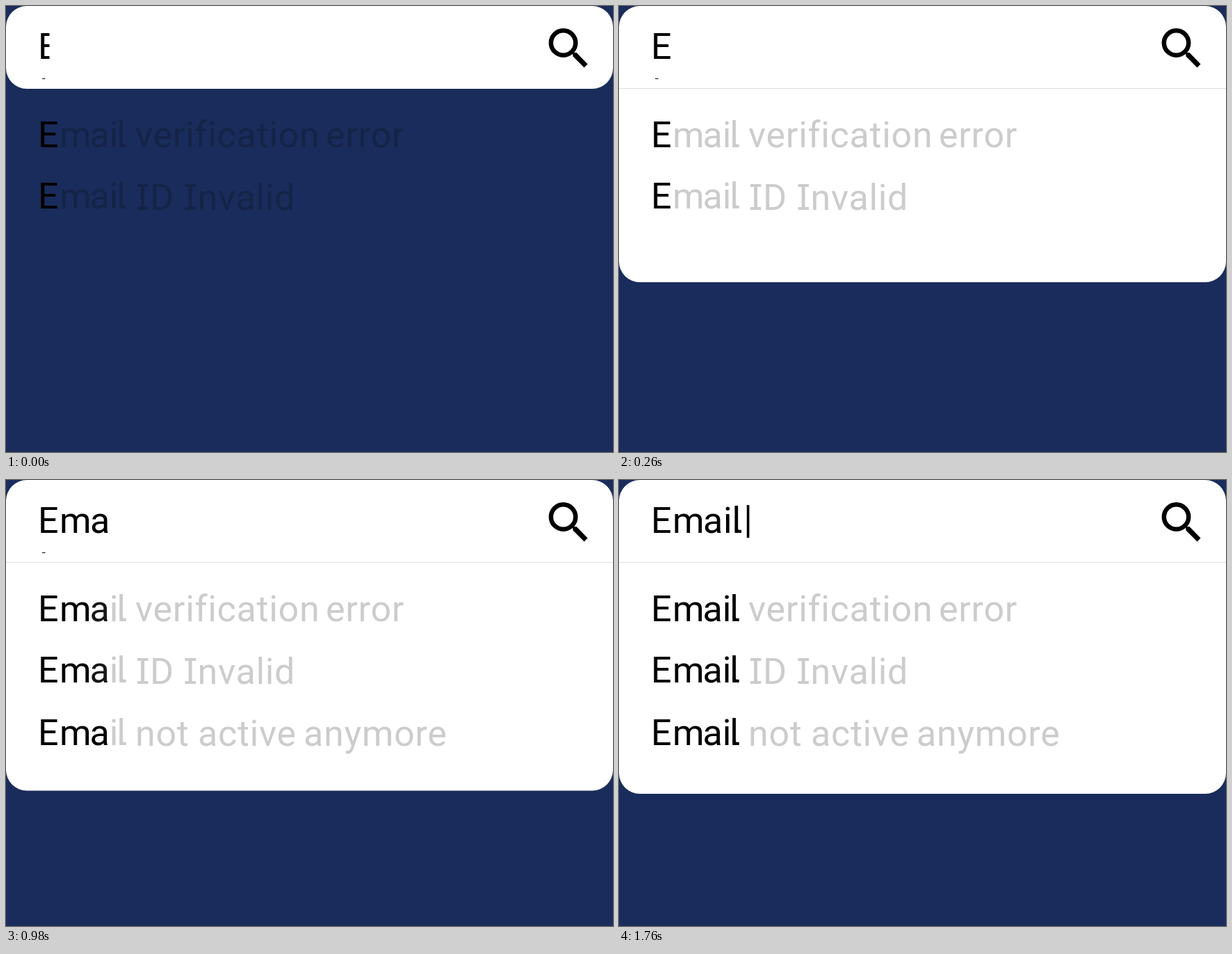
An HTML page that plays this animation: 873x641 px, repeating every 2900 ms.

```html
<!DOCTYPE html>
<html lang="en">
<head>
<meta charset="utf-8">
<title>Search suggestions</title>
<style>
  html, body { margin: 0; width: 100%; height: 100%; overflow: hidden; background: #1a2c5b; }
  svg { display: block; width: 873px; height: 641px; }
  text { font: 400 52px Roboto, "Noto Sans", sans-serif; white-space: pre; }
  .word { letter-spacing: .7px; }
</style>
</head>
<body>
<svg id="stage" viewBox="0 0 873 641">
  <rect id="panel" width="873" height="119" rx="30" fill="#fff"/>
  <rect id="divider" y="118" width="873" height="1" fill="#ddd"/>
  <circle cx="801.5" cy="53" r="17.7" fill="none" stroke="#000" stroke-width="6.5"/>
  <path d="M815 67H820.5L836.5 83.5 831.5 88.5 815.5 72.5Z"/>
</svg>
<script>
const LOOP = 2900;
const FAINT = 0.2;
const stage = document.getElementById('stage');

// Time span of each step, in ms
const OPEN = [10, 264], TYPE_M = [270, 520], SETTLE = [540, 760],
      TYPE_A = [780, 1060], TYPE_IL = [1085, 1380], FINISH = [1525, 1750];

function add(parent, tag, attrs, content = '') {
  const el = document.createElementNS('http://www.w3.org/2000/svg', tag);
  for (const name in attrs) el.setAttribute(name, attrs[name]);
  el.textContent = content;
  return parent.appendChild(el);
}

// Moves a property through values; each step is [value, [start, end]].
function tween(el, prop, first, ...steps) {
  let value = first;
  const frames = [{ [prop]: value, offset: 0 }];
  for (const [next, [start, end]] of steps) {
    frames.push({ [prop]: value, offset: start / LOOP, easing: 'ease-out' });
    frames.push({ [prop]: next, offset: end / LOOP });
    value = next;
  }
  frames.push({ [prop]: value, offset: 1 });
  el.animate(frames, { duration: LOOP, iterations: Infinity });
}

function letter(parent, char, x, base) {
  const g = add(parent, 'g', {});
  add(g, 'text', { x, y: base }, char);
  if (char === 'l') {
    add(g, 'path', { d: `M${x + 6.3} ${base - 8}q0 5.9 3.8 5.9h3.4`,
      fill: 'none', stroke: '#000', 'stroke-width': 4.2 });
  }
  return g;
}

function prefix(parent, base, xs) {
  return [...'Email'].map((char, i) => letter(parent, char, xs[i], base));
}

function words(parent, base, list) {
  const g = add(parent, 'g', { opacity: FAINT });
  for (const [x, word] of list) {
    add(g, 'text', { x, y: base, class: 'word' }, word);
    if (word !== 'I') continue;
    for (const y of [base - 37, base - 4]) add(g, 'rect', { x: x - 0.6, y, width: 15.6, height: 4 });
  }
}

// Sliver of the wrapped cursor, switched hard at the given times
function dash(x, first, ...switches) {
  const el = add(stage, 'rect', { x, y: 104, width: 4.5, height: 1 });
  tween(el, 'opacity', first, ...switches.map(([value, at]) => [value, [at, at]]));
}

tween(document.getElementById('panel'), 'height', '119px',
  ['397px', OPEN], ['411.5px', TYPE_M], ['451px', TYPE_A]);
tween(document.getElementById('divider'), 'opacity', 0, [1, [10, 20]]);

// Search field: the text is uncovered as its box widens
prefix(stage, 76, [46, 77, 121, 150, 162.5]);
add(stage, 'rect', { x: 183.8, y: 36, width: 3.6, height: 47 });
const cover = add(stage, 'rect', { x: 62.5, y: 30, width: 130, height: 60, fill: '#fff' });
const slide = x => `translateX(${x - 62.5}px)`;
tween(cover, 'transform', slide(62.5), [slide(78), OPEN], [slide(121), TYPE_M],
  [slide(151), TYPE_A], [slide(178), TYPE_IL], [slide(190), FINISH]);
dash(52, 1, [0, SETTLE[0]], [1, TYPE_A[0]], [0, FINISH[0]]);
dash(79.5, 0, [1, SETTLE[0]], [0, TYPE_A[0]]);

// Suggestions: spans say when each letter of the prefix turns black
const rowXs = [46, 77, 120.5, 148.7, 159.2];
const rows = [
  { base: 203, spans: [0, TYPE_M, TYPE_A, TYPE_IL, FINISH],
    rest: [[186, 'verification'], [460, 'error']] },
  { base: 291, drop: 2, spans: [0, TYPE_M, TYPE_A, TYPE_IL, TYPE_IL],
    rest: [[189.4, 'I'], [207, 'D'], [258, 'I'], [275.5, 'nvalid']] },
  { base: 381, drop: 1, late: true, spans: [0, 0, SETTLE, TYPE_IL, FINISH],
    rest: [[186, 'not'], [276, 'active'], [428, 'anymore']] },
];
for (const { base, drop = 0, late, spans, rest } of rows) {
  const row = add(stage, 'g', {});
  prefix(row, base, rowXs).forEach((el, i) => {
    if (spans[i]) tween(el, 'opacity', FAINT, [1, spans[i]]);
  });
  words(row, base + drop, rest);
  if (late) tween(row, 'opacity', 0, [1, TYPE_M]);
}
</script>
</body>
</html>
```
